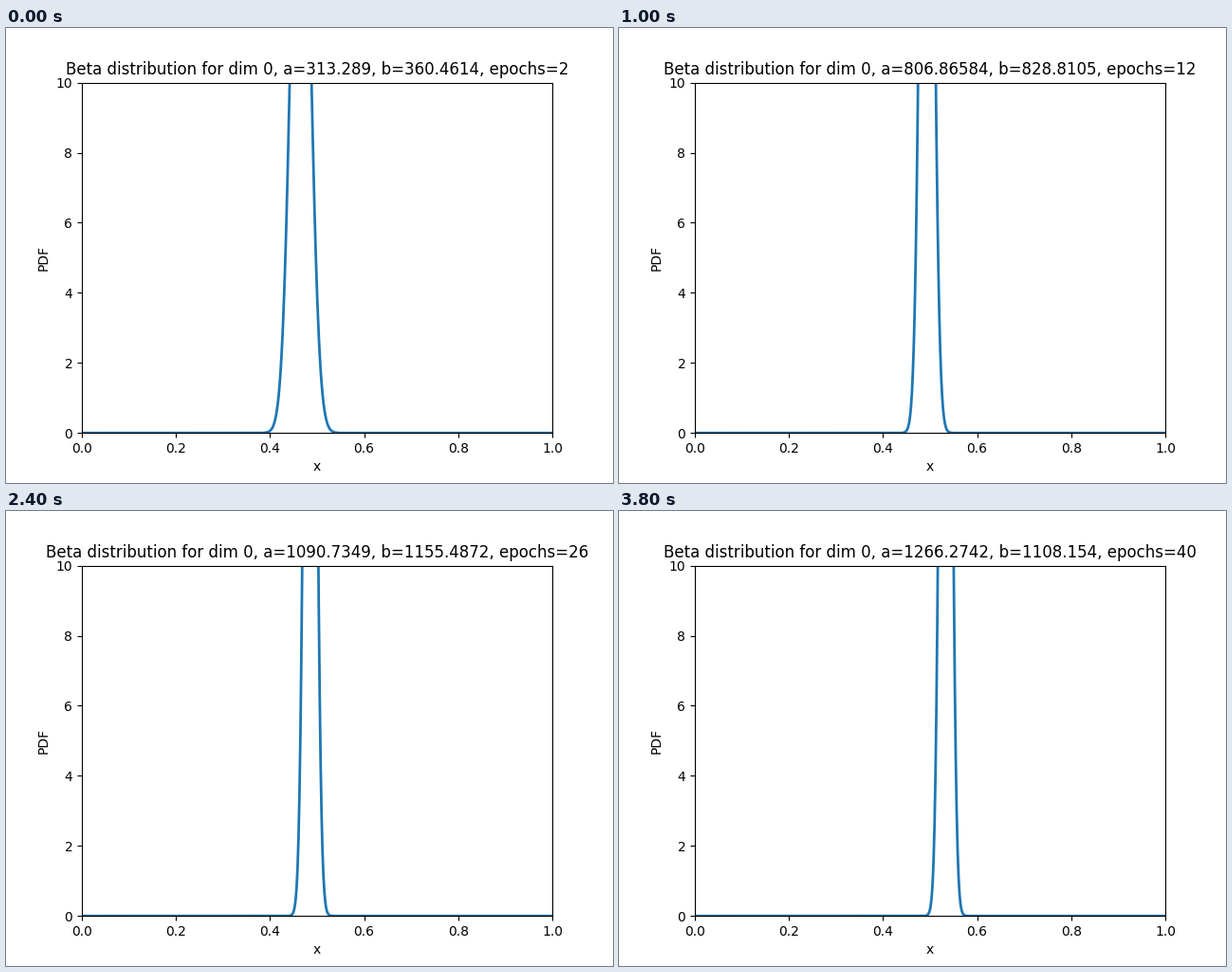
A matplotlib script for the animation above (4 s loop, 640 by 480 pixels).

```python
from math import lgamma

import matplotlib.pyplot as plt
import numpy as np
from matplotlib.animation import FuncAnimation

STEP_MS = 200
STEPS = 20
EPOCHS_PER_STEP = 2

# Turning points of the fit (epoch, a, b); the values run straight between them.
KEYS = [
    (2, 313.289, 360.4614),
    (10, 708.4135, 778.15924),
    (14, 905.3182, 879.46173),
    (16, 940.4067, 738.60474),
    (20, 958.1369, 673.16943),
    (26, 1090.7349, 1155.4872),
    (30, 1236.3146, 1101.521),
    (32, 1215.4827, 1158.2639),
    (36, 1250.4668, 1091.177),
    (40, 1266.2742, 1108.154),
]
key_epochs, key_a, key_b = zip(*KEYS)

x = np.linspace(0, 1, 1000)
with np.errstate(divide="ignore"):
    log_x, log_rest = np.log(x), np.log1p(-x)


def beta_pdf(a, b):
    log_norm = lgamma(a + b) - lgamma(a) - lgamma(b)
    return np.exp(log_norm + (a - 1) * log_x + (b - 1) * log_rest)


def short(value):
    """Shortest single-precision text, so the digit count varies."""
    return str(np.float32(value))


fig, ax = plt.subplots(figsize=(6.4, 4.8), dpi=100)
line, = ax.plot([], [], lw=2)
ax.set(xlim=(0, 1), ylim=(0, 10), xlabel="x", ylabel="PDF")
title = ax.set_title("")


def update(i):
    epochs = EPOCHS_PER_STEP * (i + 1)
    a = float(np.interp(epochs, key_epochs, key_a))
    b = float(np.interp(epochs, key_epochs, key_b))
    line.set_data(x, beta_pdf(a, b))
    title.set_text(f"Beta distribution for dim 0, a={short(a)}, "
                   f"b={short(b)}, epochs={epochs}")
    return line, title


anim = FuncAnimation(fig, update, frames=STEPS, interval=STEP_MS,
                     repeat=True, repeat_delay=0, blit=False)
plt.show()
```
